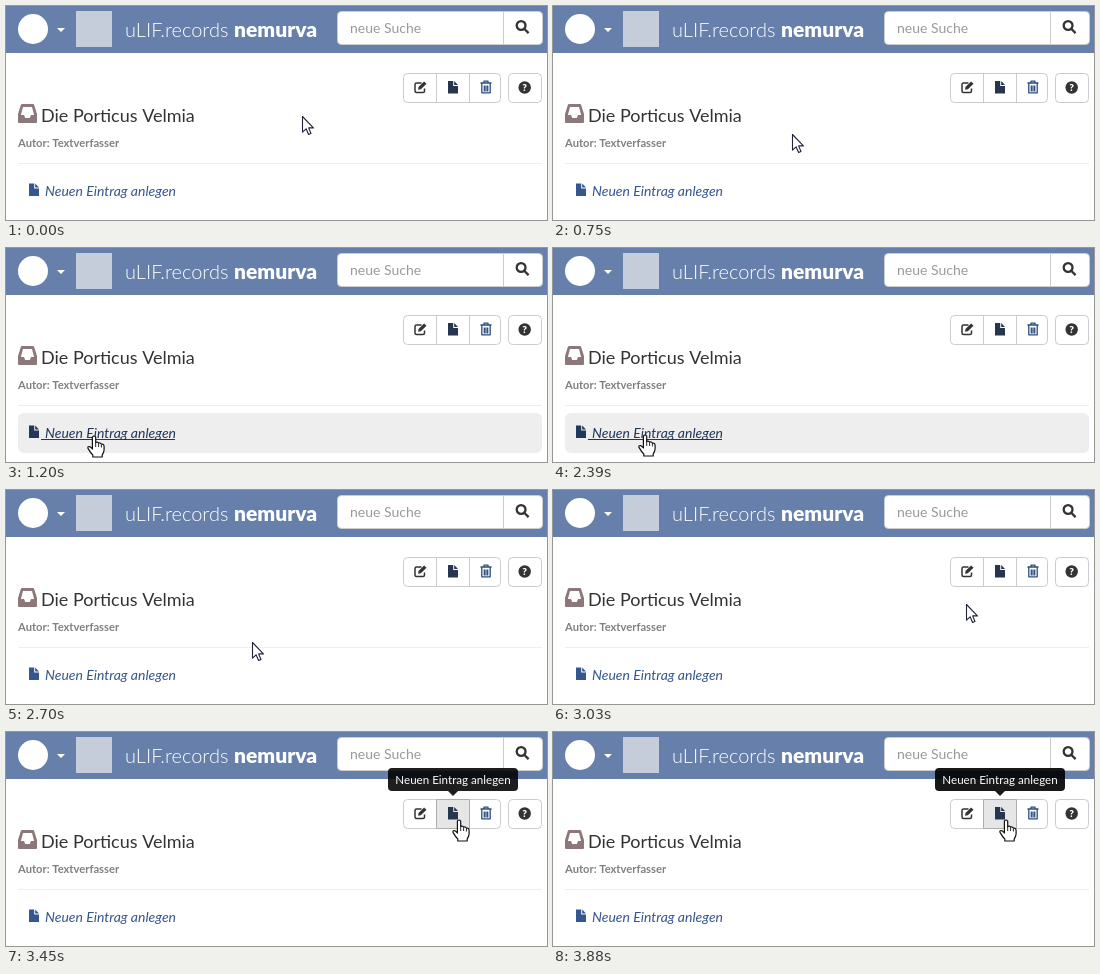
Recreate the animation shown at these times as an HTML page with a canvas. Size 541x214 px, loop 4470 ms.

```html
<!DOCTYPE html>
<html lang="de">
<head>
<meta charset="utf-8">
<title>Neuen Eintrag anlegen</title>
<style>
  html, body { margin: 0; width: 100%; height: 100%; overflow: hidden; background: #fff; }
  canvas { display: block; width: 541px; height: 214px; }
</style>
</head>
<body>
<canvas id="stage"></canvas>
<script>
const W = 541, H = 214, LOOP = 4470;
const FONT = 'Lato, "Open Sans", sans-serif';
const dpr = window.devicePixelRatio || 1;

function context(canvas) {
  canvas.width = W * dpr;
  canvas.height = H * dpr;
  const c = canvas.getContext('2d');
  c.scale(dpr, dpr);
  return c;
}

const stage = context(document.getElementById('stage'));
const layer = context(document.createElement('canvas'));
let ctx = stage;

// Pointer track: time, x, y
const track = [
  [0, 296, 110], [445, 296, 110], [750, 239, 128], [990, 118, 178], [1200, 88, 188],
  [2360, 88, 188], [2390, 92, 187], [2700, 245, 152], [2910, 376, 126],
  [3090, 425, 109], [3270, 450, 97], [3330, 453, 90], [3450, 453, 88], [LOOP, 453, 88]
];
const ROW = [12, 165, 524, 40];
const LINK = [23, 177, 146, 18];
const BUTTON = [431, 67, 33, 30];
const TIP_START = 3285, TIP_FADE = 170;

const clamp = v => Math.max(0, Math.min(1, v));
const inside = (p, [x, y, w, h]) => p.x >= x && p.x <= x + w && p.y >= y && p.y <= y + h;
const slope = (i, k) => (track[i + 1][k] - track[i][k]) / (track[i + 1][0] - track[i][0]);

// Harmonic tangent keeps the curve free of overshoot
function tangent(i, k) {
  if (i === 0 || i === track.length - 1) return 0;
  const a = slope(i - 1, k), b = slope(i, k);
  return a * b <= 0 ? 0 : 2 * a * b / (a + b);
}

function pointer(t) {
  let i = 0;
  while (i < track.length - 2 && t >= track[i + 1][0]) i++;
  const d = track[i + 1][0] - track[i][0];
  const u = clamp((t - track[i][0]) / d);
  const at = k => {
    const p = track[i][k], q = track[i + 1][k];
    const s = u * u * (3 - 2 * u);
    return p + (q - p) * s + d * u * (1 - u) * ((1 - u) * tangent(i, k) - u * tangent(i + 1, k));
  };
  return { x: at(1), y: at(2) };
}

function text(str, x, y, font, color, align = 'left') {
  ctx.font = font + ' ' + FONT;
  ctx.fillStyle = color;
  ctx.textAlign = align;
  ctx.fillText(str, x, y);
}

function rect(x, y, w, h, r, fill, stroke) {
  ctx.beginPath();
  ctx.roundRect(x, y, w, h, r);
  if (fill) { ctx.fillStyle = fill; ctx.fill(); }
  if (stroke) { ctx.strokeStyle = stroke; ctx.lineWidth = 1; ctx.stroke(); }
}

function disc(x, y, r, color) {
  ctx.beginPath();
  ctx.arc(x, y, r, 0, Math.PI * 2);
  ctx.fillStyle = color;
  ctx.fill();
}

function shape(d, x, y, fill, stroke, width = 1) {
  const path = new Path2D(d);
  ctx.save();
  ctx.translate(x, y);
  ctx.lineWidth = width;
  ctx.lineJoin = 'round';
  if (fill) { ctx.fillStyle = fill; ctx.fill(path, 'evenodd'); }
  if (stroke) { ctx.strokeStyle = stroke; ctx.stroke(path); }
  ctx.restore();
}

const fileIcon = (x, y, color) =>
  shape('M0 0H5.2V5H10V12.5H0ZM6.2 0L10 4H6.2Z', x, y, color);

function header() {
  ctx.fillStyle = '#6680ab';
  ctx.fillRect(0, 0, W, 47);
  disc(27, 23, 15, '#fff');
  shape('M0 0H8L4 4Z', 51, 22, '#fff');
  ctx.fillStyle = '#c5cddb';
  ctx.fillRect(70, 5, 36, 36);
  text('uLIF.records', 119, 31, '300 20px', '#fff');
  text('nemurva', 228, 31, '900 21px', '#fff');
  rect(331.5, 5.5, 166, 33, [4, 0, 0, 4], '#fff', '#ccc');
  rect(497.5, 5.5, 39, 33, [0, 4, 4, 0], '#fff', '#ccc');
  text('neue Suche', 344, 27, '14px', '#999');
  shape('M9.5 5A4.4 4.4 0 1 1 .7 5A4.4 4.4 0 1 1 9.5 5M8.2 8.2L12.6 12.6', 510, 14.5, null, '#333', 2.3);
}

function toolbar(hover) {
  rect(397.5, 67.5, 97, 29, 4, '#fff', '#ccc');
  shape('M0 0V30M33 0V30', 430.5, 67, null, '#ccc');
  if (hover) rect(430.5, 67.5, 33, 29, 0, '#e6e6e6', '#adadad');
  shape('M7 1H2Q.5 1 .5 2.5V9Q.5 10.5 2 10.5H8.5Q10 10.5 10 9V6.5', 408.5, 76, null, '#333', 1.5);
  shape('M4 5.5L9.6 0L12 2.2L6.4 7.8L3.6 8.3Z', 408.5, 75.5, '#333');
  fileIcon(442, 75, '#26364f');
  shape('M0 2.5H11M3.5 2.5V.7H7.5V2.5M1.3 3V12.3H9.7V3M3.8 5V11M5.5 5V11M7.2 5V11', 474.5, 74.5, null, '#2a4e80', 1.3);
  rect(502.5, 67.5, 33, 29, 4, '#fff', '#ccc');
  disc(518.7, 81.5, 6.2, '#333');
  text('?', 518.7, 85.2, '900 10px', '#fff', 'center');
}

function heading() {
  shape('M4 0H15Q15.8 0 16.1 .8L19 10V18Q19 19 18 19H1Q0 19 0 18V10L2.9 .8Q3.2 0 4 0Z' +
    'M5 3L2.9 11H6L7.2 14H11.8L13 11H16.1L14 3Z', 12, 98, '#8c777b');
  text('Die Porticus Velmia', 35, 116, '18px', '#333');
  text('Autor: Textverfasser', 12, 141, '700 11.2px', '#808080');
  ctx.fillStyle = '#eee';
  ctx.fillRect(12, 157, 524, 1);
}

function entry(rowHover, linkHover) {
  if (rowHover) rect(...ROW, 6, '#eee');
  const color = linkHover ? '#22375a' : '#36568f';
  fileIcon(23, 177.5, color);
  text('Neuen Eintrag anlegen', 39, 190, 'italic 14px', color);
  if (linkHover) {
    ctx.fillStyle = color;
    ctx.fillRect(35, 191, 134, 1);
  }
}

// Drawn once on its own layer so that box and label fade as one
function paintTooltip() {
  ctx = layer;
  rect(382, 36, 130, 23, 4, '#000');
  shape('M0 0H10L5 5Z', 442, 59, '#000');
  text('Neuen Eintrag anlegen', 447, 52, '11.6px', '#fff', 'center');
  ctx = stage;
}

function tooltip(alpha) {
  ctx.globalAlpha = alpha * 0.9;
  ctx.drawImage(layer.canvas, 0, 0, W, H);
  ctx.globalAlpha = 1;
}

function cursor(p, hand) {
  const x = Math.round(p.x), y = Math.round(p.y);
  if (hand) {
    shape('M-1.6 1.2Q0 -1.2 1.7 1.2V6.6Q3.2 5.4 4.6 7.2Q6.2 6.2 7.4 8.2Q9.9 7.6 10.1 10.4V14Q9.9 16.5 8.2 18.8V21H-1.2V19' +
      'Q-3.7 16.5 -6 12.4Q-6.6 10.4 -4.5 10.5Q-2.9 11.2 -1.6 13Z', x, y, '#fff', '#111', 1.2);
    shape('M1.7 6.6V11M4.6 7.6V11M7.4 8.6V11.5', x, y, null, '#111', 0.9);
  } else {
    shape('M.5 .5V16.2L4.1 12.8L6.6 18.5L9 17.5L6.6 11.9H11.4Z', x, y, '#fff', '#22223a', 1.1);
  }
}

function draw(t) {
  const p = pointer(t);
  const probe = pointer(Math.max(0, t - 25));
  const onLink = inside(probe, LINK);
  const onButton = inside(probe, BUTTON);
  ctx.fillStyle = '#fff';
  ctx.fillRect(0, 0, W, H);
  header();
  toolbar(onButton);
  heading();
  entry(inside(probe, ROW), onLink);
  tooltip(clamp((t - TIP_START) / TIP_FADE));
  cursor(p, onLink || onButton);
}

paintTooltip();
const start = performance.now();
function tick() {
  draw((performance.now() - start) % LOOP);
  requestAnimationFrame(tick);
}
tick();
</script>
</body>
</html>
```
